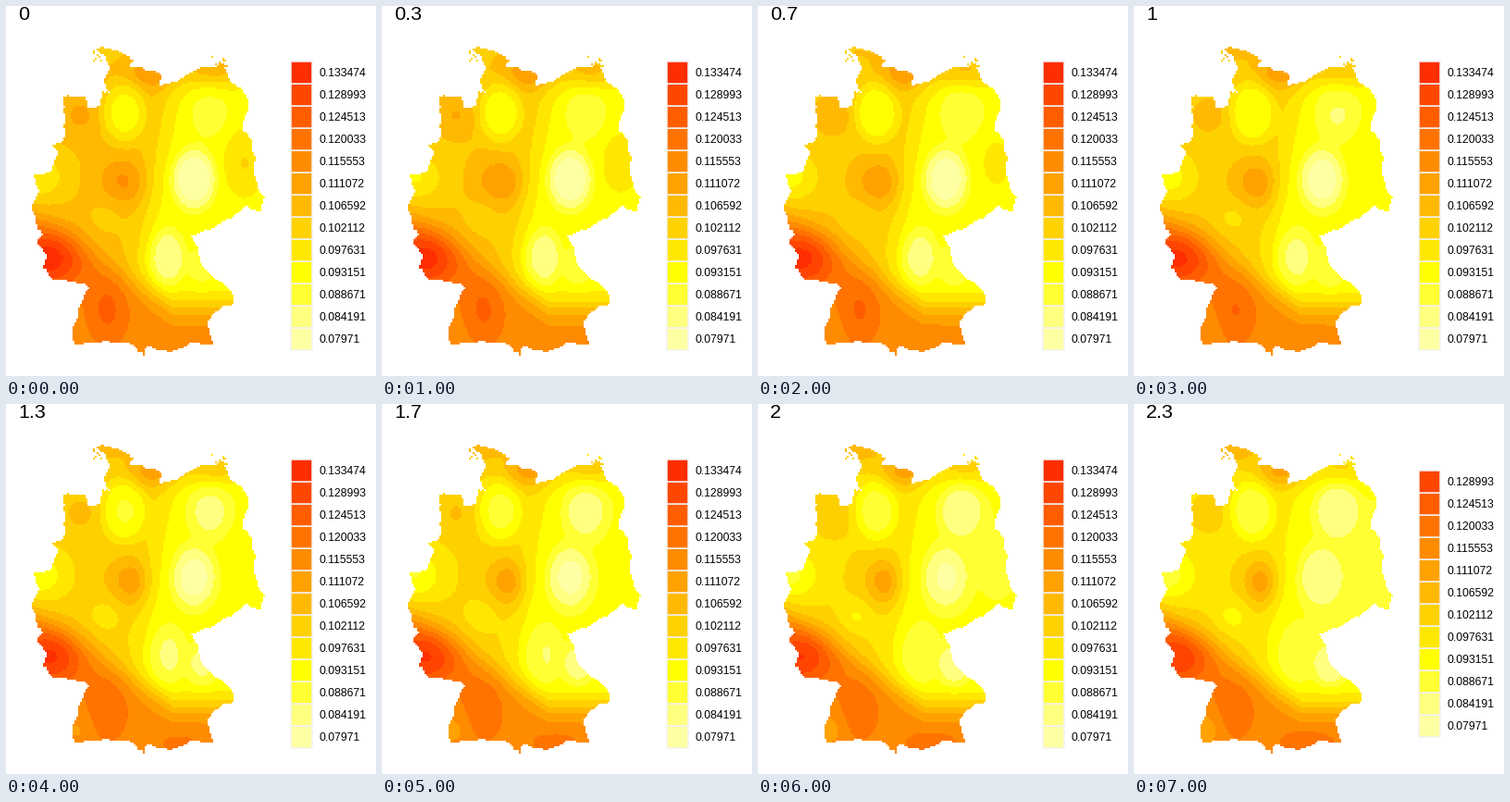
A matplotlib script for the animation above (8 s loop, 400 by 400 pixels).

```python
import colorsys

import matplotlib.pyplot as plt
import numpy as np
from matplotlib.animation import FuncAnimation
from matplotlib.patches import Rectangle
from matplotlib.path import Path

SIZE, CELL = 400, 2
FRAMES, INTERVAL = 8, 1000
LOW, STEP = 0.0797103, 0.00448029
FONT = "Liberation Sans"
PX = 0.72  # points per pixel at 100 dpi

# Corners of the border, clockwise from the north-west tip
BORDER = [
    (97, 45), (110, 47), (126, 51), (138, 60), (133, 65), (147, 67), (166, 72),
    (168, 79), (165, 88), (184, 82), (200, 72), (222, 66), (236, 62), (243, 83),
    (255, 90), (262, 111), (255, 134), (266, 148), (268, 182), (279, 207),
    (274, 223), (259, 215), (248, 226), (202, 248), (198, 247), (209, 264),
    (212, 281), (246, 313), (244, 323), (234, 325), (217, 342), (224, 367),
    (201, 363), (168, 372), (153, 367), (149, 377), (139, 367), (108, 362),
    (98, 364), (75, 366), (72, 359), (75, 342), (91, 305), (72, 297), (51, 296),
    (40, 283), (44, 271), (33, 256), (40, 247), (28, 215), (36, 200), (30, 182),
    (50, 178), (58, 160), (51, 151), (60, 148), (64, 120), (61, 98), (84, 97),
    (88, 111), (101, 108), (104, 93), (113, 94), (106, 82), (112, 65), (104, 51),
]
ARCHIPELAGOS = [(100, 55), (232, 60)]

# x, y, x radius, y radius, height in levels, change of height per unit of time
HILLS = [
    (47, 272, 38, 32, 4.2, -0.3),
    (110, 328, 22, 36, 1.8, -0.25),
    (78, 352, 16, 18, 0, -0.5),
    (188, 366, 32, 16, 0, 0.55),
    (258, 170, 22, 36, 1.6, -0.9),
    (160, 72, 26, 18, 1.9, 0.35),
    (225, 68, 40, 20, 3, -0.4),
    (108, 50, 30, 16, -0.3, 0.9),
    (80, 118, 18, 20, 1.2, -0.1),
    (120, 188, 22, 24, 1.6, -0.5),
    (138, 193, 18, 26, 1, 0.75),
    (106, 230, 16, 16, -0.6, -0.25),
    (36, 185, 28, 26, -2, -0.1),
]
# The same, with a flat floor
BASINS = [
    (203, 187, 24, 33, -3.25, 0.55),
    (174, 272, 20, 32, -2.2, 0.6),
    (220, 115, 24, 32, -0.8, -0.5),
    (212, 282, 18, 24, -0.8, -0.45),
    (128, 115, 24, 34, -2.4, 0.05),
]


def heat_palette():
    """Pale yellow through yellow and orange to red."""
    pale = [(1, 1, b / 255) for b in (164, 128, 51)]
    warm = [colorsys.hsv_to_rgb(k / 66, 1, 1) for k in range(11, 1, -1)]
    return np.array(pale + warm)


def roughen(points, rng, rounds=3, amount=0.12):
    """Displace midpoints sideways for a ragged border."""
    pts = np.array(points, float)
    for _ in range(rounds):
        nxt = np.roll(pts, -1, axis=0)
        side = (nxt - pts)[:, ::-1] * [1, -1]
        mid = (pts + nxt) / 2 + side * rng.uniform(-amount, amount, (len(pts), 1))
        pts = np.stack([pts, mid], axis=1).reshape(-1, 2)
    return pts


def land_mask(gx, gy):
    rng = np.random.default_rng(4)
    cells = np.column_stack([gx.ravel(), gy.ravel()])
    mask = Path(roughen(BORDER, rng)).contains_points(cells).reshape(gx.shape)
    for centre in ARCHIPELAGOS:
        for x, y in rng.normal(centre, 4, (10, 2)):
            mask[int(y / CELL), int(x / CELL)] = True
    return mask


def sigmoid(u):
    return 1 / (1 + np.exp(-u))


def bumps(shapes, x, y, t, power):
    total = 0
    for cx, cy, rx, ry, height, rate in shapes:
        u = ((x - cx) / rx) ** 2 + ((y - cy) / ry) ** 2
        total = total + (height + rate * t) * np.exp(-u ** power)
    return total


def field(x, y, t):
    """Colour level: a west-east step, a southern rise, and local bumps."""
    west, east, south = 5.6 - 0.6 * t, 2.95 - 0.2 * t, 8
    level = east + (west - east) * sigmoid((195 - 0.19 * y - x) / 9)
    foothills = np.minimum(326, 207 + 0.66 * x)
    level = level + (south - level) * sigmoid((y - foothills) / 9)
    return level + bumps(HILLS, x, y, t, 1) + bumps(BASINS, x, y, t, 2)


centres = np.arange(CELL / 2, SIZE, CELL)
gx, gy = np.meshgrid(centres, centres)
land = land_mask(gx, gy)
palette = heat_palette()

fig = plt.figure(figsize=(4, 4), dpi=100, facecolor="white")
ax = fig.add_axes([0, 0, 1, 1])
ax.axis("off")
picture = ax.imshow(np.ones(land.shape + (3,)), extent=(0, SIZE, SIZE, 0),
                    interpolation="nearest", aspect="auto")
ax.set_xlim(0, SIZE)
ax.set_ylim(SIZE, 0)
title = ax.text(13, 15, "", family=FONT, size=21.5 * PX, va="baseline")

legend = []
for level, colour in enumerate(palette):
    box = ax.add_patch(Rectangle((308, 0), 23, 24, facecolor=colour,
                                 edgecolor="#f2f2f2", linewidth=1.5 * PX))
    label = ax.text(338.5, 0, f"{LOW + level * STEP:.6f}".rstrip("0"),
                    family=FONT, size=12.3 * PX, va="baseline")
    legend.append((box, label))


def draw(n):
    t = n / 3
    top = 12 if t <= 2 else 11
    levels = np.clip(np.rint(field(gx[land], gy[land], t)), 0, top)
    rgb = np.ones(land.shape + (3,))
    rgb[land] = palette[levels.astype(int)]
    picture.set_data(rgb)
    title.set_text(f"{round(t, 1):g}")
    for level, (box, label) in enumerate(legend):
        y = 215.5 + (top / 2 - level) * 24
        box.set_y(y - 12)
        label.set_y(y + 4.5)
        box.set_visible(level <= top)
        label.set_visible(level <= top)
    return [picture, title]


anim = FuncAnimation(fig, draw, frames=FRAMES, interval=INTERVAL, repeat=True,
                     repeat_delay=0, init_func=lambda: draw(0))
plt.show()
```
